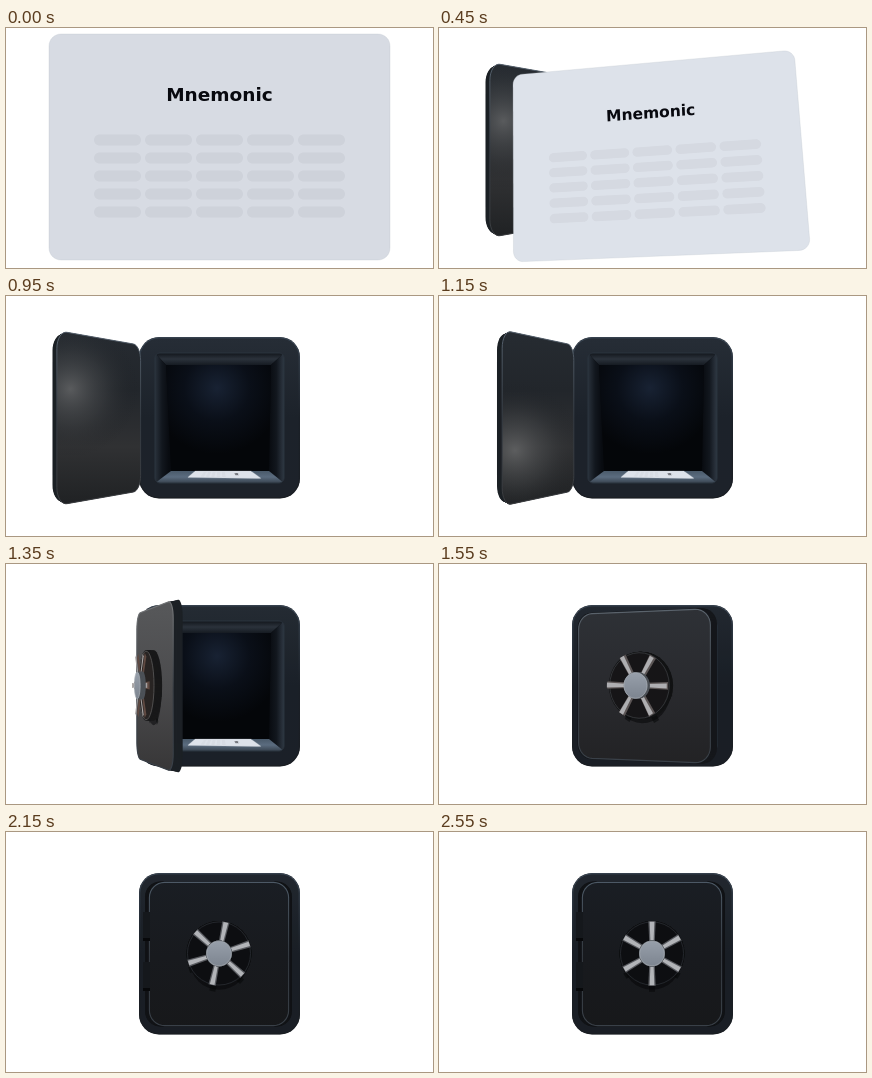
Write an HTML page with a canvas that moves like this. It is 427x240 px and loops after 2600 ms.

```html
<!DOCTYPE html>
<html lang="en">
<head>
<meta charset="utf-8">
<title>Mnemonic safe</title>
<style>
html, body { margin: 0; width: 100%; height: 100%; overflow: hidden; background: #fff; }
canvas { display: block; width: 427px; height: 240px; }
</style>
</head>
<body>
<canvas id="stage"></canvas>
<script>
const W = 427, H = 240, LOOP = 2600, STEP = 50;
const canvas = document.getElementById('stage');
const ctx = canvas.getContext('2d');
const dpr = window.devicePixelRatio || 1;
canvas.width = W * dpr;
canvas.height = H * dpr;

const clamp = x => Math.max(0, Math.min(1, x));
const lerp = (a, b, k) => a + (b - a) * k;
const progress = (t, from, to) => clamp((t - from) / (to - from));
const sine = x => (1 - Math.cos(Math.PI * x)) / 2;
const radians = deg => deg * Math.PI / 180;
const mix = (a, b, k) => `rgb(${a.map((v, i) => Math.round(lerp(v, b[i], k)))})`;

function trace(points) {
  ctx.beginPath();
  points.forEach(p => ctx.lineTo(p[0], p[1]));
  ctx.closePath();
}
function fill(points, paint) {
  trace(points);
  ctx.fillStyle = paint;
  ctx.fill();
}
function stroke(points, paint, width) {
  trace(points);
  ctx.strokeStyle = paint;
  ctx.lineWidth = width;
  ctx.stroke();
}
function withStops(g, colors) {
  colors.forEach((c, i) => g.addColorStop(i / (colors.length - 1), c));
  return g;
}
const linear = (x0, y0, x1, y1, ...colors) =>
  withStops(ctx.createLinearGradient(x0, y0, x1, y1), colors);
const radial = (x, y, r, ...colors) =>
  withStops(ctx.createRadialGradient(x, y, 0, x, y, r), colors);

function roundRect(x0, y0, x1, y1, r) {
  const points = [];
  const centers = [[x1 - r, y1 - r], [x0 + r, y1 - r], [x0 + r, y0 + r], [x1 - r, y0 + r]];
  centers.forEach(([x, y], q) => {
    for (let i = 0; i <= 8; i++) {
      const a = (q + i / 8) * Math.PI / 2;
      points.push([x + r * Math.cos(a), y + r * Math.sin(a)]);
    }
  });
  return points;
}
const circle = (x, y, r) => roundRect(x - r, y - r, x + r, y + r, r);

// Card: corners run top left, top right, bottom right, bottom left.
const CARD_W = 341, CARD_H = 226;
const POSES = {
  rest: [[43, 6], [384, 6], [384, 232], [43, 232]],
  away: [[74, 47], [355, 22], [371.5, 222], [74.5, 234]],
  near: [[108.5, 82], [249, 65.5], [258, 160], [117, 172]],
  inside: [[150, 106], [252, 95], [261, 160], [158, 170]],
  floor: [[245, 175], [255.5, 182.5], [181.5, 181.5], [189, 175]]
};
const blend = (a, b, k) => a.map((p, i) => [lerp(p[0], b[i][0], k), lerp(p[1], b[i][1], k)]);

function cardPose(t) {
  if (t < 450) return POSES.rest;
  if (t < 750) {
    const k = progress(t, 450, 750);
    return blend(POSES.away, POSES.near, 2 * k / (1 + k));
  }
  if (t < 850) return blend(POSES.near, POSES.inside, progress(t, 750, 850));
  return blend(POSES.inside, POSES.floor, progress(t, 850, 950));
}

function homography([a, b, c, d]) {
  const sx = a[0] - b[0] + c[0] - d[0], sy = a[1] - b[1] + c[1] - d[1];
  const dx1 = b[0] - c[0], dy1 = b[1] - c[1], dx2 = d[0] - c[0], dy2 = d[1] - c[1];
  const det = dx1 * dy2 - dx2 * dy1;
  const g = (sx * dy2 - dx2 * sy) / det, h = (dx1 * sy - sx * dy1) / det;
  return ([x, y]) => {
    const u = x / CARD_W, v = y / CARD_H, w = g * u + h * v + 1;
    return [0, 1].map(i =>
      ((b[i] - a[i] + g * b[i]) * u + (d[i] - a[i] + h * d[i]) * v + a[i]) / w);
  };
}

function drawCard(t) {
  const map = homography(cardPose(t));
  const lit = t < 450 ? 0 : 1;
  const face = roundRect(0, 0, CARD_W, CARD_H, 12).map(map);
  fill(face, mix([215, 219, 227], [221, 226, 234], lit));
  stroke(face, 'rgba(185,190,199,.45)', 0.6);

  const bar = mix([206, 210, 218], [213, 217, 225], lit);
  for (let row = 0; row < 5; row++) {
    for (let col = 0; col < 5; col++) {
      const x = 45 + col * 51, y = 100.5 + row * 18;
      fill(roundRect(x, y, x + 47, y + 11, 5.5).map(map), bar);
    }
  }

  const at = [170.5, 67], o = map(at);
  const ex = map([at[0] + 1, at[1]]), ey = map([at[0], at[1] + 1]);
  ctx.save();
  ctx.transform(ex[0] - o[0], ex[1] - o[1], ey[0] - o[0], ey[1] - o[1], o[0], o[1]);
  ctx.font = 'bold 18.5px "DejaVu Sans", sans-serif';
  ctx.textAlign = 'center';
  ctx.fillStyle = '#08090f';
  ctx.fillText('Mnemonic', 0, 0);
  ctx.restore();
}

function drawBody(closed) {
  const shell = roundRect(133, 41, 294, 202.5, 20);
  fill(shell, linear(0, 41, 0, 203, '#262d36', '#1c222a', '#1d222a'));
  fill(shell, `rgba(8,8,8,${0.15 * closed})`);
  stroke(roundRect(133.8, 41.8, 293.2, 201.7, 19.2),
    linear(0, 41, 0, 203, '#3d4a58', '#1a1f26', '#1a1d21'), 1);
}

function drawInterior() {
  const l = 149, r = 278, top = 57, bottom = 187;
  const il = 160, ir = 265, it = 69, ib = 175;
  const opening = roundRect(l, top, r, bottom, 5);
  ctx.save();
  trace(opening);
  ctx.clip();
  ctx.fillStyle = '#07090d';
  ctx.fillRect(l, top, r - l, bottom - top);
  fill([[l, top], [r, top], [ir, it], [il, it]], linear(0, top, 0, it, '#12161c', '#2b323b', '#161b22'));
  fill([[l, top], [il, it], [il + 5, ib], [l, bottom]], linear(l, 0, il + 3, 0, '#29313b', '#12171e', '#080b10'));
  fill([[r, top], [ir, it], [ir - 2, ib], [r, bottom]], linear(r, 0, ir - 2, 0, '#2f3843', '#12171e', '#080b10'));
  fill([[il, it], [ir, it], [ir - 2, ib], [il + 5, ib]],
    radial(211, 92, 66, '#182233', '#0a0f18', '#040609'));
  fill([[l, bottom], [il + 5, ib], [ir - 2, ib], [r, bottom]],
    linear(0, ib, 0, bottom, '#4a5a6a', '#5b6c7f', '#38434f'));
  ctx.restore();
  stroke(opening, '#2b343e', 1);
}

// Door coordinates: u from the hinge, v down, n outwards from the door plane.
function doorSpace(angle) {
  const c = Math.cos(angle), s = Math.sin(angle);
  return n => ([u, v]) => {
    const k = 810 / (810 - u * s - n * c);
    return [213 + (u * c - n * s - 77) * k, 122 + v * k];
  };
}

function drawWheel(at, turn, open) {
  const cx = 77, cy = -0.5;
  const spoke = (i, r0, w0, r1, w1) => {
    const a = turn + radians(i * 60 - 90), c = Math.cos(a), s = Math.sin(a);
    return [[r0, -w0], [r1, -w1], [r1, w1], [r0, w0]]
      .map(([r, w]) => [cx + r * c - w * s, cy + r * s + w * c]);
  };
  const spokes = [0, 1, 2, 3, 4, 5];

  const drop = ([u, v]) => at(7)([u, v + 7]);
  fill(circle(cx, cy, 29).map(drop), 'rgba(6,7,8,.55)');
  spokes.forEach(i => fill(spoke(i, 9, 3, 31, 3).map(drop), 'rgba(6,7,8,.55)'));

  for (let n = 7; n <= 14; n++) {
    fill(circle(cx, cy, 32).map(at(n)), mix([15, 16, 18], [24, 24, 25], open));
  }
  const disc = circle(cx, cy, 31).map(at(14));
  fill(disc, mix([13, 14, 17], [40, 36, 35], open));
  stroke(disc, mix([38, 42, 47], [85, 84, 84], open), 0.9);

  spokes.forEach(i => {
    fill(spoke(i, 9, 2.6, 31.5, 3.6).map(at(18)), mix([88, 90, 95], [96, 74, 66], open));
    fill(spoke(i, 11, 1.5, 31, 2.3).map(at(20)), mix([178, 180, 184], [166, 162, 162], open));
  });
  for (let n = 17; n < 22; n++) {
    fill(circle(cx, cy, 12.6).map(at(n)), '#4c5157');
  }
  const hub = circle(cx, cy, 12).map(at(22));
  fill(hub, linear(0, 108, 0, 134, '#98a0ab', '#7d8590'));
  stroke(hub, '#adb2b9', 0.7);
}

function drawDoor(t) {
  const swing = sine(progress(t, 1060, 1765));
  const angle = radians(112.5 * (1 - swing));
  const open = clamp(angle / 1.25);
  const at = doorSpace(angle);
  const slab = n => roundRect(lerp(3, 8, n / 7), lerp(-72.5, -71, n / 7),
    lerp(150, 146, n / 7), lerp(72.5, 71, n / 7), 15).map(at(n));
  const free = at(7)([146, 0]), hinge = at(7)([8, 0]);
  const outside = free[0] > hinge[0];

  for (let i = 0; i <= 7; i++) {
    const n = outside ? i : 7 - i;
    fill(slab(n), mix([17, 19, 22], [28, 32, 37], open));
  }
  if (!outside) {
    const face = slab(0);
    // The glint slides down the panel as the door starts to swing.
    const glint = lerp(93, 155, clamp(swing * 25));
    fill(face, linear(0, 38, 0, 207, '#262b31', '#22262b', '#303133', '#202224'));
    fill(face, radial(free[0] + 18, glint, 68, 'rgba(108,109,110,.75)', 'rgba(74,76,78,.38)', 'rgba(25,28,32,0)'));
    stroke(face, linear(0, 38, 0, 207, '#56616d', '#343b43', '#3b3d40'), 1);
    return;
  }

  const face = slab(7);
  fill(face, linear(0, 45, 0, 205,
    mix([26, 30, 36], [86, 87, 89], open),
    mix([24, 26, 30], [75, 75, 77], open),
    mix([23, 24, 26], [56, 55, 56], open)));
  stroke(face, linear(0, 45, 0, 205,
    mix([78, 91, 104], [116, 118, 120], open), '#343a41', '#3a4149'), 1.1);
  if (angle < 0.35) {
    [80, 130].forEach(y => {
      ctx.fillStyle = '#15181c';
      ctx.fillRect(137, y, 7, 26);
      ctx.fillStyle = '#07080a';
      ctx.fillRect(137, y + 26, 7, 3);
    });
  }
  const turn = radians(-150 * (1 - sine(progress(t, 1500, 2550))));
  drawWheel(at, turn, open);
}

function draw(t) {
  ctx.setTransform(dpr, 0, 0, dpr, 0, 0);
  ctx.clearRect(0, 0, W, H);
  if (t < 450) {
    drawCard(t);
    return;
  }
  drawBody(sine(progress(t, 1060, 1765)));
  drawInterior();
  if (t >= 850) drawCard(t);
  drawDoor(t);
  if (t < 850) drawCard(t);
}

const start = performance.now();
function tick() {
  const t = (performance.now() - start) % LOOP;
  draw(Math.floor(t / STEP) * STEP);
  requestAnimationFrame(tick);
}
tick();
</script>
</body>
</html>
```
